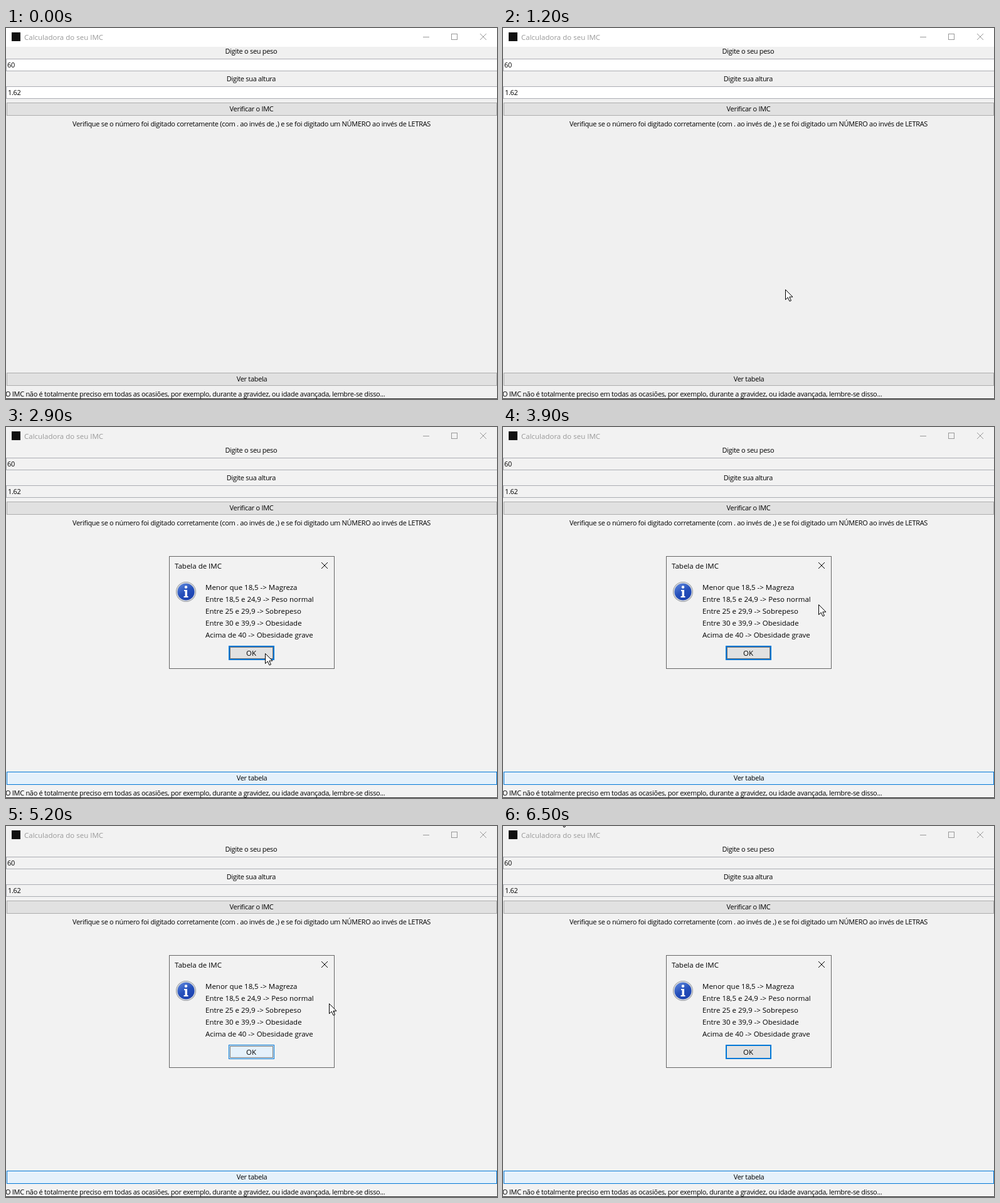
An HTML page with a canvas for the animation above (6600 ms loop, 783 by 592 pixels).

```html
<!DOCTYPE html>
<html lang="pt-BR">
<head>
<meta charset="utf-8">
<title>Calculadora do seu IMC</title>
<style>
  html, body { margin: 0; width: 100%; height: 100%; overflow: hidden; background: #f0f0f0; }
  canvas { display: block; }
</style>
</head>
<body>
<canvas id="stage" width="783" height="592"></canvas>
<script>
const ctx = document.getElementById('stage').getContext('2d');
const LOOP = 6600, STEP = 100;
const BLUE = '#0078d7', HOVER = '#e5f1fb', FACE = '#e1e1e1';
const ACTIVATE = 1800, DIALOG = 2400, BLUR = 6300;

// Pointer path: time, x, y
const path = [
  [100, 160, 28], [300, 178, 122], [400, 190, 158], [500, 197, 172],
  [600, 197, 172], [800, 270, 232], [1000, 385, 345], [1200, 450, 417],
  [1300, 440, 514], [1400, 436, 543], [1600, 431, 562], [1900, 431, 562],
  [2000, 430, 545], [2200, 429, 490], [2500, 427, 475], [2600, 427, 475],
  [2900, 413, 361], [3100, 404, 225], [3300, 398, 132], [3600, 440, 205],
  [3900, 503, 283], [4000, 513, 283], [4100, 515, 283], [5200, 515, 283],
  [5500, 330, 178], [5800, 123, 64], [6100, 100, 14], [6300, 90, -17], [6600, 90, -17]
];

const arrow = [[0, 0], [0, 16], [3.7, 12.5], [6.5, 18.5], [9, 17.5], [6.3, 11.6], [11.5, 11.6]];

const rows = [
  'Menor que 18,5 -> Magreza',
  'Entre 18,5 e 24,9 -> Peso normal',
  'Entre 25 e 29,9 -> Sobrepeso',
  'Entre 30 e 39,9 -> Obesidade',
  'Acima de 40 -> Obesidade grave'
];

const clamp = v => Math.max(0, Math.min(1, v));

function pointerAt(t) {
  const i = path.findIndex(p => p[0] > t);
  if (i < 1) return null;
  const [t0, x0, y0] = path[i - 1], [t1, x1, y1] = path[i];
  const k = (t - t0) / (t1 - t0);
  return { x: Math.round(x0 + (x1 - x0) * k), y: Math.round(y0 + (y1 - y0) * k) };
}

function fill(x, y, w, h, color) {
  ctx.fillStyle = color;
  ctx.fillRect(x, y, w, h);
}

function box(x, y, w, h, face, edge, weight = 1) {
  fill(x, y, w, h, edge);
  fill(x + weight, y + weight, w - 2 * weight, h - 2 * weight, face);
}

function dotted(x, y, w, h) {
  ctx.strokeStyle = '#000';
  ctx.lineWidth = 1;
  ctx.setLineDash([1, 1]);
  ctx.strokeRect(x + 0.5, y + 0.5, w - 1, h - 1);
  ctx.setLineDash([]);
}

function text(str, x, y, align = 'left', color = '#000') {
  ctx.font = '11px "Open Sans", sans-serif';
  ctx.letterSpacing = '-0.3px';
  ctx.textAlign = align;
  ctx.fillStyle = color;
  ctx.fillText(str, x, y);
}

function uiText(str, x, y, align = 'left', color = '#000') {
  ctx.font = '11.5px "Open Sans", sans-serif';
  ctx.letterSpacing = '0px';
  ctx.textAlign = align;
  ctx.fillStyle = color;
  ctx.fillText(str, x, y);
}

function cross(x, y, color) {
  ctx.strokeStyle = color;
  ctx.lineWidth = 1;
  ctx.beginPath();
  ctx.moveTo(x, y);
  ctx.lineTo(x + 10, y + 10);
  ctx.moveTo(x + 10, y);
  ctx.lineTo(x, y + 10);
  ctx.stroke();
}

function titleBar(active, back) {
  const color = active ? '#000' : '#999';
  fill(0, 0, 783, 30, back);
  fill(9, 7, 14, 14, '#111');
  uiText('Calculadora do seu IMC', 29, 19, 'left', color);
  fill(665, 14, 10, 1, color);
  box(710, 9, 10, 10, back, color);
  cross(756, 9, color);
}

function tableButton(t, over) {
  let face = FACE, edge = '#adadad';
  if (over || t >= ACTIVATE) [face, edge] = [HOVER, BLUE];
  if (t >= ACTIVATE && t < 2000) [face, edge] = ['#cce4f7', '#005499'];
  else if (t >= 2000 && t < DIALOG) face = '#d9ebf9';
  box(1, 550, 782, 21, face, edge);
  if (t >= ACTIVATE && t < DIALOG) dotted(3, 552, 778, 17);
  text('Ver tabela', 392, 564, 'center');
}

function infoIcon(x, y) {
  const disc = (r, style) => {
    ctx.fillStyle = style;
    ctx.beginPath();
    ctx.arc(x, y, r, 0, Math.PI * 2);
    ctx.fill();
  };
  const shade = ctx.createLinearGradient(x - 8, y - 14, x + 8, y + 14);
  shade.addColorStop(0, '#5b83da');
  shade.addColorStop(0.5, '#2550bb');
  shade.addColorStop(1, '#1a3fae');
  disc(16, '#8b8f96');
  disc(15.2, '#d5d8dc');
  disc(13.6, shade);
  ctx.fillStyle = '#fff';
  ctx.beginPath();
  ctx.arc(x, y - 7.5, 2.2, 0, Math.PI * 2);
  ctx.fill();
  fill(x - 3, y - 3, 5, 2, '#fff');
  fill(x - 1.5, y - 3, 3.5, 11, '#fff');
  fill(x - 3.5, y + 7, 7, 2, '#fff');
}

function okButton(t) {
  // The default button slowly pulses to its hover look and back
  const pulse = clamp((t - 3900) / 1000) * (1 - clamp((t - 5200) / 900));
  box(355, 349, 73, 23, FACE, BLUE, 2);
  ctx.globalAlpha = pulse;
  box(355, 349, 73, 23, HOVER, BLUE);
  ctx.globalAlpha = 1;
  if (t < BLUR) dotted(357, 351, 69, 19);
  uiText('OK', 391, 365, 'center');
}

function dialog(t) {
  box(260, 206, 264, 180, '#f2f2f2', '#666');
  uiText('Tabela de IMC', 269, 226);
  cross(503, 216, '#000');
  infoIcon(287, 263);
  rows.forEach((row, i) => uiText(row, 318, 260 + 19 * i));
  okButton(t);
}

function pointer({ x, y }) {
  ctx.beginPath();
  for (const [dx, dy] of arrow) ctx.lineTo(x + dx + 0.5, y + dy + 0.5);
  ctx.closePath();
  ctx.fillStyle = '#fff';
  ctx.fill();
  ctx.strokeStyle = '#000';
  ctx.lineWidth = 1;
  ctx.stroke();
}

function draw(t) {
  const open = t >= DIALOG;
  const panel = open ? '#f2f2f2' : '#f0f0f0';
  const paper = open ? '#f2f2f2' : '#fff';
  const mouse = pointerAt(t);
  const over = top => !open && mouse && mouse.y >= top && mouse.y < top + 21;

  fill(0, 0, 783, 592, panel);
  titleBar(t >= ACTIVATE && !open, paper);

  text('Digite o seu peso', 391, 41, 'center');
  box(0, 49, 784, 20, paper, '#abadb3');
  text('60', 2, 63);
  text('Digite sua altura', 391, 85, 'center');
  box(0, 93, 784, 20, paper, '#abadb3');
  text('1.62', 3, 107);

  box(1, 119, 782, 21, over(119) ? HOVER : FACE, over(119) ? BLUE : '#adadad');
  text('Verificar o IMC', 391.5, 133, 'center');
  text('Verifique se o número foi digitado corretamente (com . ao invés de ,) e se foi digitado um NÚMERO ao invés de LETRAS', 391.5, 157, 'center');

  tableButton(t, over(550));
  text('O IMC não é totalmente preciso em todas as ocasiões, por exemplo, durante a gravidez, ou idade avançada, lembre-se disso...', -1, 588);
  fill(0, 591, 783, 1, '#2b2b2b');

  if (open) dialog(t);
  if (mouse) pointer(mouse);
}

const start = performance.now();
function tick() {
  const t = (performance.now() - start) % LOOP;
  draw(Math.floor(t / STEP) * STEP);
  requestAnimationFrame(tick);
}
tick();
</script>
</body>
</html>
```
